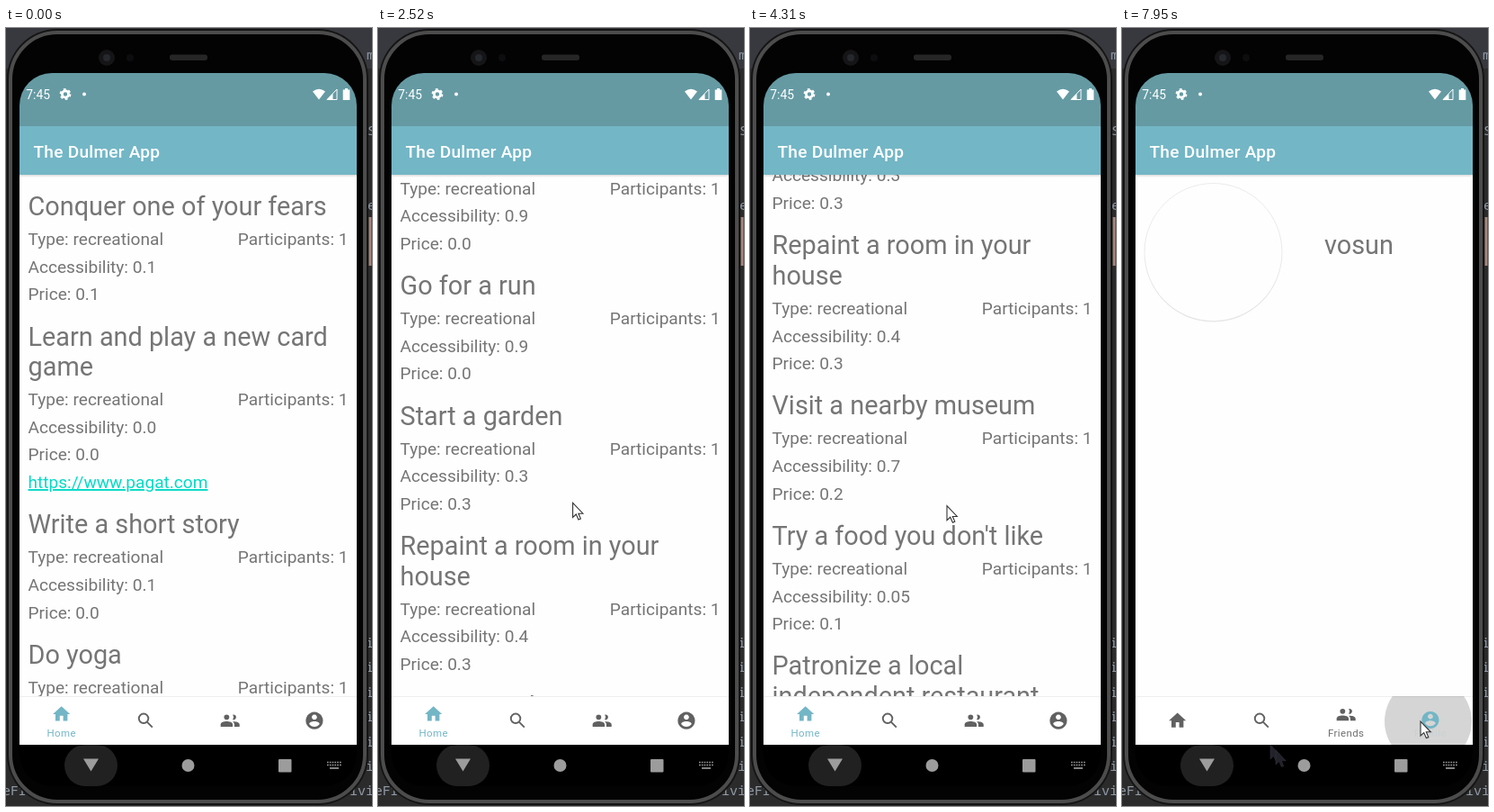
An HTML page for the animation above (8 s loop, 407 by 864 pixels).

```html
<!DOCTYPE html>
<html lang="en">
<head>
<meta charset="utf-8">
<title>Activity list</title>
<style>
html, body { margin: 0; width: 100%; height: 100%; overflow: hidden; background: #2b2b2b; }
#stage { display: block; width: 407px; height: 864px; font-family: Roboto, sans-serif; }
.code { font: 15px "Noto Sans Mono", monospace; fill: #8f9aa6; }
.title { font-size: 28.85px; fill: #757575; }
.body { font-size: 19.1px; fill: #757575; }
.note { font-size: 13.5px; fill: #757575; }
.link { fill: #03dac5; text-decoration: underline; }
.label { font-size: 11.5px; letter-spacing: .38px; text-anchor: middle; }
.end { text-anchor: end; }
.ring { fill: none; stroke: currentColor; }
</style>
</head>
<body>
<svg id="stage" viewBox="0 0 407 864">
  <defs>
    <path id="arrow" d="M0 0V16l3.7-3.4 2.7 6 2.4-1-2.5-5.8H11.3Z"/>
    <linearGradient id="shade" x2="0" y2="1">
      <stop stop-opacity=".14"/><stop offset="1" stop-opacity="0"/>
    </linearGradient>
  </defs>

  <rect width="407" height="864" fill="#2b2b2b"/>
  <rect width="407" height="45" fill="#38393e"/>
  <g id="editor" class="code"></g>
  <path d="M405 210V264" stroke="#a5877c" stroke-width="3"/>

  <rect x="1" y="1" width="402" height="862" rx="56" fill="#141414"/>
  <rect x="5" y="5" width="394" height="854" rx="52" fill="#030303" stroke="#4c4c4c" stroke-width="4"/>
  <circle cx="112" cy="33" r="9" fill="#151517"/>
  <circle cx="112" cy="33" r="4" fill="#25282d"/>
  <circle cx="138" cy="33" r="4" fill="#0d0d0f"/>
  <rect x="182" y="29.5" width="42" height="6.5" rx="3" fill="#262626"/>

  <rect x="15" y="50" width="375" height="792" rx="36"/>
  <path d="M15 109V86A36 36 0 0 1 51 50H354A36 36 0 0 1 390 86V109Z" fill="#659aa3"/>
  <rect x="15" y="109" width="375" height="54" fill="#73b6c6"/>
  <g fill="#fff">
    <text x="22.3" y="79" font-size="13.9">7:45</text>
    <text x="30.5" y="144" font-size="19.1" font-weight="500" letter-spacing=".25">The Dulmer App</text>
    <circle cx="87" cy="73.5" r="2"/>
    <path d="M341 70.5Q348 65 355 70.5L348 79.5Z"/>
    <path d="M357 79.5L368 68V79.5Z" fill="none" stroke="#fff"/>
    <path d="M357 79.5L363.5 73V79.5Z"/>
    <path d="M377 67h3v1.5h2.3v11.5h-7.6v-11.5h2.3z"/>
  </g>
  <g fill="none" stroke="#fff">
    <circle cx="66" cy="73.5" r="3.6" stroke-width="2.8"/>
    <circle cx="66" cy="73.5" r="5.4" stroke-width="2" stroke-dasharray="2.8 2.85"/>
  </g>

  <svg x="15" y="163" width="375" height="580">
    <rect width="375" height="580" fill="#fefefe"/>
    <g id="home">
      <g id="list"></g>
      <path id="glow" d="M0 0V17Q187 71 375 17V0Z" fill="#73b6c6"/>
    </g>
    <text id="search" class="note" y="15">Search Fragment</text>
    <text id="friends" class="note" y="15">Friends Fragment</text>
    <g id="account">
      <circle cx="86.5" cy="87" r="76.5" opacity=".1"/>
      <circle cx="86.5" cy="86" r="76.5" fill="#fefefe" stroke="#e6e6e6" stroke-width=".8"/>
      <text class="title" x="210" y="88">vosun</text>
    </g>
    <rect width="375" height="3" fill="url(#shade)"/>
  </svg>

  <svg x="15" y="742" width="375" height="54">
    <rect width="375" height="54" fill="#fff"/>
    <path d="M0 .5H375" stroke="#eee"/>
    <circle id="ripple" cy="28"/>
    <g id="tabs"></g>
  </svg>

  <rect x="65" y="796" width="59" height="46" rx="23" fill="#212121"/>
  <g fill="#9c9c9c">
    <path d="M86 811.5H103L94.5 825.5Z"/>
    <circle cx="202.5" cy="819" r="7"/>
    <rect x="303" y="812" width="14.5" height="14.5" rx="1"/>
  </g>
  <g stroke="#999" stroke-width="1.7">
    <path d="M357 815.5H373M357 818.5H373" stroke-dasharray="1.7 1.1"/>
    <path d="M360 822H370"/>
  </g>
  <g id="trail" fill="#22222b" stroke="#34343e" stroke-width=".5">
    <use href="#arrow" x="165" y="796"/><use href="#arrow" x="171" y="802"/>
  </g>
  <g id="cursor">
    <circle id="press" r="12" cy="1" fill="#fdf867" opacity=".9"/>
    <use href="#arrow" fill="#fff" stroke="#333" stroke-width="1.1"/>
  </g>
</svg>

<script>
const LOOP = 8000;
const $ = id => document.getElementById(id);
const clamp = v => Math.max(0, Math.min(1, v));
const ramp = (t, start, length) => clamp((t - start) / length);
const smooth = u => u * u * (3 - 2 * u);
const easeOut = u => 1 - (1 - u) ** 2;
const pulse = (t, start, rise, hold, fall) =>
  ramp(t, start, rise) * (1 - ramp(t, start + rise + hold, fall));
const text = (x, y, cls, s) => `<text x="${x}" y="${y}" class="${cls}">${s}</text>`;
const show = (id, on) => { $(id).style.display = on ? '' : 'none'; };

// title (/ breaks the line) | accessibility | price | link
const activities = `Conquer one of your fears|0.1|0.1
Learn and play a new card/game|0.0|0.0|https://www.pagat.com
Write a short story|0.1|0.0
Do yoga|0.9|0.0
Go for a run|0.9|0.0
Start a garden|0.3|0.3
Repaint a room in your/house|0.4|0.3
Visit a nearby museum|0.7|0.2
Try a food you don't like|0.05|0.1
Patronize a local/independent restaurant|0.1|0.2
Learn to write with your/nondominant hand|0.02|0.0
Learn how to play a new/sport|0.2|0.1
Binge watch a trending/series|0.2|0.2
Plan a trip to another/country|0.0|0.2
Play a video game|0.0|0.0`;

function buildList() {
  const ROW = 30.6, LINE = 33.7, LEFT = 9.5;
  let y = 45, rows = '';
  for (const entry of activities.split('\n')) {
    const [title, access, price, link] = entry.split('|');
    const lines = title.split('/');
    lines.forEach((s, i) => rows += text(LEFT, y + i * LINE, 'title', s));
    y += (lines.length - 1) * LINE + 33;
    rows += text(365.5, y, 'body end', 'Participants: 1');
    const details = ['Type: recreational', 'Accessibility: ' + access, 'Price: ' + price];
    details.forEach((s, i) => rows += text(LEFT, y + i * ROW, 'body', s));
    y += 2 * ROW;
    if (link) rows += text(LEFT, y += ROW, 'body link', link);
    y += 50.3;
  }
  return rows;
}
$('list').innerHTML = buildList();

let code = text(401, 35, '', 'm') + text(402, 119, '', 'S') + text(402, 202, '', 'e') +
  text(-4, 852, '', 'eFr') + text(382, 852, '', 'ivi');
for (let i = 0; i < 6; i++) code += text(400, 688 + i * 27.4, '', 'i');
$('editor').innerHTML = code;

// aim: where the pointer rests while tapping
const tabs = [
  { id: 'home', label: 'Home', tap: -LOOP,
    icon: '<path d="M10 20v-6h4v6h5v-8h3L12 3 2 12h3v8z"/>' },
  { id: 'search', label: 'Search', tap: 5230, aim: [160, 779],
    icon: '<g class="ring" stroke-width="2"><circle cx="9.5" cy="9.5" r="5.5"/><path d="M13.7 13.7l6 6"/></g>' },
  { id: 'friends', label: 'Friends', tap: 6390, aim: [246, 770],
    icon: '<circle cx="8" cy="8" r="3"/><path d="M1 19v-2.5c0-4.7 14-4.7 14 0V19z"/>' +
      '<path d="M15 5.2a3 3 0 1 1 0 5.6q2-2.8 0-5.6zm0 7.9c4 0 8 1 8 3.4V19h-6v-2.5q0-2.1-2-3.4z"/>' },
  { id: 'account', label: 'Profile', tap: 7800, aim: [332, 770],
    icon: '<path fill-rule="evenodd" d="M12 2a10 10 0 1 0 .01 0zM12 5a3 3 0 1 1-.01 0zM6 16c0-4.1 12-4.1 12 0q-2.2 3.2-6 3.2T6 16z"/>' }
];
tabs.forEach((tab, i) => {
  tab.x = 46.7 + 93.75 * i;
  tab.on = tab.tap + 80;
  tab.off = i < 3 ? tabs[i + 1].tap + 80 : 2 * LOOP;
});
$('tabs').innerHTML = tabs.map(tab =>
  `<g><g>${tab.icon}</g>${text(tab.x, 45, 'label', tab.label)}</g>`).join('');
const tabNodes = [...$('tabs').children];

// Each swipe drags the list with the pointer, then lets it coast.
const swipe = (start, end, from, to, coast) => ({ start, end, from, to, coast });
const swipes = [
  swipe(1150, 1350, 620, 330, 13),
  swipe(1500, 1760, 300, 603, 0),
  swipe(1930, 2230, 603, 283, 253),
  swipe(2640, 3000, 590, 238, 320),
  swipe(3270, 3560, 590, 183, 180),
  swipe(3740, 4080, 183, 740, -471),
  swipe(4540, 4700, 324, 640, -560)
];
const COAST = 400;
const listOffset = t => Math.max(0, swipes.reduce((sum, s) => sum +
  (s.from - s.to) * smooth(ramp(t, s.start, s.end - s.start)) +
  s.coast * easeOut(ramp(t, s.end, COAST)), 0));

// Pointer stops follow from the swipes and taps: [time, x, y]
const stops = [[430, 66, 813], [700, 172, 623], [1040, 172, 623]];
swipes.forEach((s, i) => {
  const x = 211 + 2 * Math.min(i, 4);
  stops.push([s.start, x, s.from], [s.end, x, s.to]);
});
stops.push([5020, 171, 802]);
for (const { tap, aim } of tabs.slice(1)) stops.push([tap - 100, ...aim], [tap + 800, ...aim]);

function pointerAt(t) {
  const i = Math.max(1, stops.findIndex(stop => stop[0] > t));
  const [t0, x0, y0] = stops[i - 1], [t1, x1, y1] = stops[i];
  const k = smooth(ramp(t, t0, t1 - t0));
  return [x0 + (x1 - x0) * k, y0 + (y1 - y0) * k];
}
const isPressed = t => swipes.some(s => t >= s.start && t < s.end + 120) ||
  tabs.some(tab => t >= tab.tap && t < tab.tap + 100);

function draw(t) {
  $('list').setAttribute('transform', `translate(0 ${-listOffset(t)})`);
  $('glow').setAttribute('opacity', .13 * (pulse(t, 1690, 130, 60, 200) + pulse(t, 4880, 80, 0, 200)));

  tabs.forEach((tab, i) => {
    const selected = t >= tab.on && t < tab.off;
    const raised = ramp(t, tab.on + 60, 110) - ramp(t, tab.off + 60, 110);
    const [icon, label] = tabNodes[i].children;
    const color = selected ? '#73b6c6' : '#616161';
    show(tab.id, selected);
    tabNodes[i].setAttribute('fill', color);
    tabNodes[i].setAttribute('color', color);
    icon.setAttribute('transform', `translate(${tab.x - 11.5} ${15.7 - 7.3 * raised}) scale(.957)`);
    label.setAttribute('opacity', raised);
  });

  const { x, tap } = tabs.findLast(tab => t >= tab.tap);
  $('ripple').setAttribute('cx', x - 2.5);
  $('ripple').setAttribute('r', 20 + 28.5 * ramp(t, tap, 130));
  $('ripple').setAttribute('opacity', .165 * pulse(t, tap, 80, 150, 250));

  show('cursor', t >= 430);
  show('trail', t >= 5050);
  show('press', isPressed(t));
  $('cursor').setAttribute('transform', `translate(${pointerAt(t)})`);
}

const start = performance.now();
function frame() {
  draw((performance.now() - start) % LOOP);
  requestAnimationFrame(frame);
}
frame();
</script>
</body>
</html>
```
